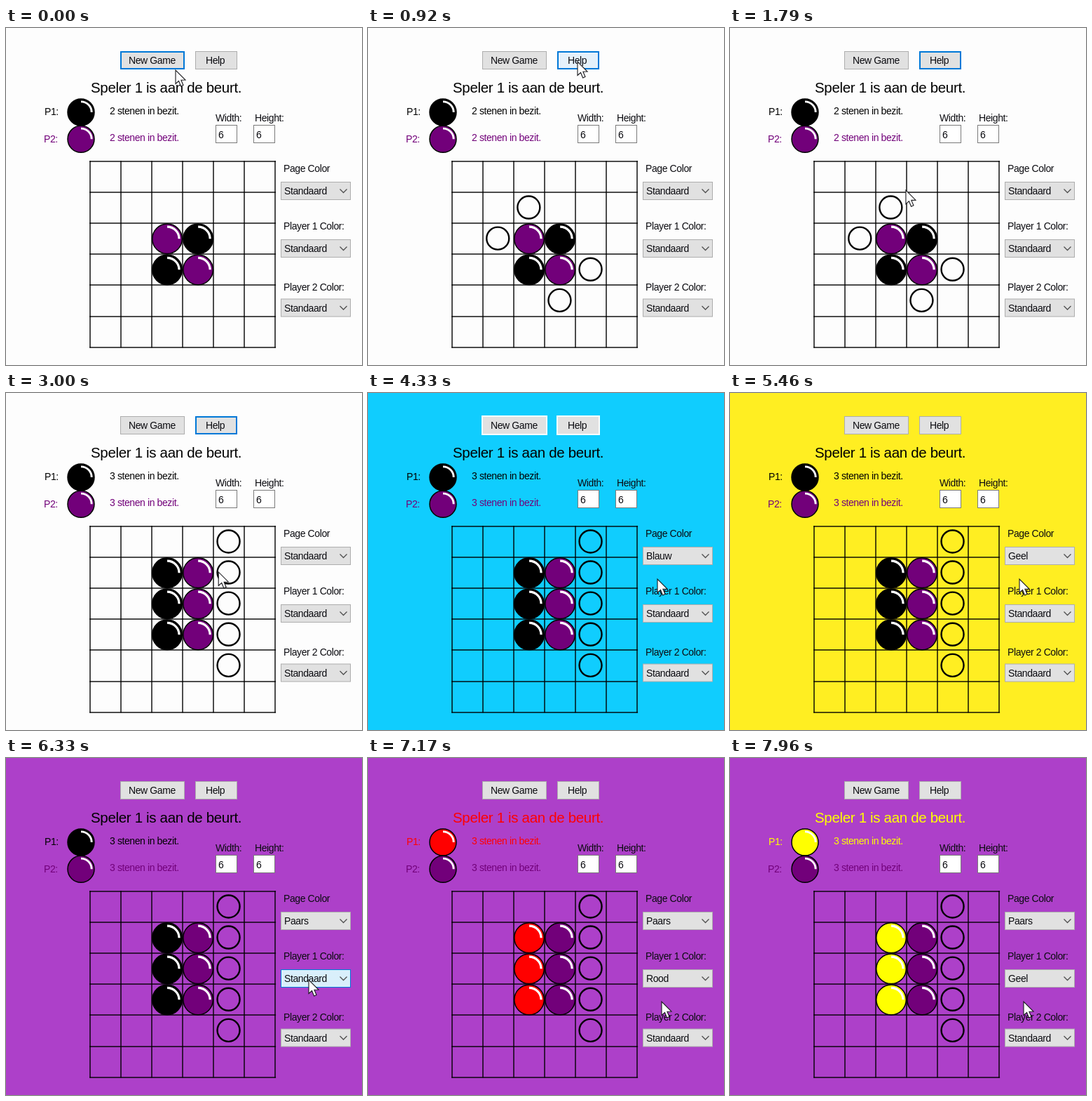
Recreate the animation shown at these times as an HTML page with a canvas. Size 508x480 px, loop 8000 ms.

```html
<!DOCTYPE html>
<html lang="nl">
<head>
<meta charset="utf-8">
<title>Bordspel</title>
<style>
  html, body { margin: 0; width: 100%; height: 100%; overflow: hidden; background: #fdfdfd; }
  canvas { display: block; width: 508px; height: 480px; }
</style>
</head>
<body>
<canvas id="stage" width="508" height="480"></canvas>
<script>
const ctx = document.getElementById('stage').getContext('2d');
const LOOP = 8000;
const FONT = '"Liberation Sans", Arial, sans-serif';
const INK = '#0b0b10', PURPLE = '#72007a', ACCENT = '#0078d7';
const BOARD = { x: 119.8, y: 190, cell: 44.1, size: 6 };

const NAMES = ['Standaard', 'Blauw', 'Rood', 'Groen', 'Geel', 'Paars'];
const PAGE = ['#fdfdfd', '#10cdfe', '#cc0e3e', '#14ff82', '#ffee22', '#ad40c9'];
const STONE = ['#000000', '#0000ff', '#ff0000', '#008000', '#ffff00', '#800080'];

// Moments at which each selected index moves one step down its list
const PAGE_STEPS = [4250, 4500, 4750, 5150, 5500];
const STONE_STEPS = [6830, 7150, 7450, 7720];
const HELP_AT = 680, MOVE1 = 2140, MOVE2 = 2740;
const MENUS = [
  { from: 3780, to: 4250, x: 392, y: 245 },
  { from: 6400, to: 6830, x: 392, y: 327 }
];

// Cursor path: time, x, y
const PATH = [
  [0, 242, 60], [60, 242, 60], [560, 299, 48], [1000, 299, 48], [1790, 251, 231],
  [2050, 232, 255], [2300, 232, 255], [2620, 274, 256], [2820, 274, 256],
  [3000, 303, 255], [3600, 440, 233], [3840, 440, 233], [4160, 413, 265],
  [5930, 413, 265], [6270, 432, 316], [6480, 432, 316], [6760, 419, 347], [8000, 419, 347]
];

const same = (a, b) => a[1] === b[1] && a[2] === b[2];

function speed(i, axis) {
  const a = PATH[i - 1], b = PATH[i], c = PATH[i + 1];
  if (!a || !c || same(a, b) || same(b, c)) return 0;
  return (c[axis] - a[axis]) / (c[0] - a[0]);
}

function cursorAt(t) {
  let i = 0;
  while (i < PATH.length - 2 && t >= PATH[i + 1][0]) i++;
  const a = PATH[i], b = PATH[i + 1], d = b[0] - a[0];
  const u = (t - a[0]) / d, u2 = u * u, u3 = u2 * u;
  return [1, 2].map(k =>
    (2 * u3 - 3 * u2 + 1) * a[k] + (u3 - 2 * u2 + u) * d * speed(i, k) +
    (3 * u2 - 2 * u3) * b[k] + (u3 - u2) * d * speed(i + 1, k));
}

const stepAt = (steps, t) => steps.filter(s => t >= s).length;

// Stones and hints are [row, column]
function gameAt(t) {
  if (t < MOVE1) return {
    turn: 1, p1: [[2, 3], [3, 2]], p2: [[2, 2], [3, 3]],
    hints: t < HELP_AT ? [] : [[1, 2], [2, 1], [3, 4], [4, 3]]
  };
  if (t < MOVE2) return {
    turn: 2, p1: [[1, 2], [2, 2], [3, 2], [2, 3]], p2: [[3, 3]],
    hints: [[1, 1], [1, 3], [3, 1]]
  };
  return {
    turn: 1, p1: [1, 2, 3].map(r => [r, 2]), p2: [1, 2, 3].map(r => [r, 3]),
    hints: [0, 1, 2, 3, 4].map(r => [r, 4])
  };
}

function text(s, x, y, color = INK, size = 14, track = -0.4) {
  ctx.font = size + 'px ' + FONT;
  ctx.letterSpacing = track + 'px';
  ctx.fillStyle = color;
  ctx.fillText(s, x, y);
}

function box(x, y, w, h, fill, edge, line = 1) {
  ctx.fillStyle = edge;
  ctx.fillRect(x, y, w, h);
  ctx.fillStyle = fill;
  ctx.fillRect(x + line, y + line, w - 2 * line, h - 2 * line);
}

const inside = (p, x, y, w, h) => p[0] >= x && p[0] < x + w && p[1] >= y && p[1] < y + h;

function button(label, x, w, tx, focus, ring, mouse) {
  const over = inside(mouse, x, 33, w, 26);
  if (ring) {
    ctx.fillStyle = ring;
    ctx.fillRect(x - 1, 32, w + 2, 28);
  }
  box(x, 33, w, 26, over ? '#e5f1fb' : '#e1e1e1',
    focus || over ? ACCENT : ring || '#adadad', focus ? 2 : 1);
  text(label, tx, 51);
}

function combo(value, y, mouse, open) {
  const over = open || inside(mouse, 392, y, 100, 26);
  box(392, y, 100, 26, over ? '#d9effb' : '#e1e1e1', over ? ACCENT : '#adadad');
  text(value, 397, y + 18);
  ctx.strokeStyle = '#505050';
  ctx.lineWidth = 1.3;
  ctx.beginPath();
  ctx.moveTo(476.5, y + 10.5);
  ctx.lineTo(481.5, y + 15.5);
  ctx.lineTo(486.5, y + 10.5);
  ctx.stroke();
}

function menu(m, mouse) {
  const row = 15.6;
  box(m.x, m.y, 100, row * NAMES.length + 2, '#ffffff', ACCENT);
  const hot = Math.max(0, Math.min(NAMES.length - 1, Math.floor((mouse[1] - m.y - 1) / row)));
  NAMES.forEach((name, i) => {
    const y = m.y + 1 + i * row;
    if (i === hot) {
      ctx.fillStyle = ACCENT;
      ctx.fillRect(m.x + 1, y, 98, row);
    }
    text(name, m.x + 4, y + 12.6, i === hot ? '#ffffff' : INK);
  });
}

function stone(x, y, r, color) {
  ctx.beginPath();
  ctx.arc(x, y, r, 0, 2 * Math.PI);
  ctx.fillStyle = color;
  ctx.fill();
  ctx.strokeStyle = '#000000';
  ctx.lineWidth = 1.5;
  ctx.stroke();
  ctx.beginPath();
  ctx.arc(x, y, r * 0.8, -Math.PI / 2, 0);
  ctx.strokeStyle = '#ffffff';
  ctx.lineWidth = r * 0.15;
  ctx.stroke();
}

function board(game, colors) {
  const { x, y, cell, size } = BOARD, span = cell * size;
  const center = ([r, c]) => [x + (c + 0.5) * cell, y + (r + 0.5) * cell];
  ctx.fillStyle = '#000000';
  for (let i = 0; i <= size; i++) {
    ctx.fillRect(Math.round(x + i * cell) - 0.7, y - 0.7, 1.4, span + 1.4);
    ctx.fillRect(x - 0.7, Math.round(y + i * cell) - 0.7, span + 1.4, 1.4);
  }
  [game.p1, game.p2].forEach((list, i) =>
    list.forEach(p => stone(...center(p), 21.3, colors[i])));
  ctx.strokeStyle = '#000000';
  ctx.lineWidth = 2.4;
  for (const p of game.hints) {
    const [cx, cy] = center(p);
    ctx.beginPath();
    ctx.arc(cx - 0.7, cy - 0.6, 16, 0, 2 * Math.PI);
    ctx.stroke();
  }
}

function pointer([x, y]) {
  const shape = [[0, 0], [0, 19.5], [4.5, 15.5], [7.6, 23], [11, 21.5], [7.9, 14.2], [14, 14]];
  ctx.beginPath();
  shape.forEach(([dx, dy]) => ctx.lineTo(x + dx, y + dy));
  ctx.closePath();
  ctx.fillStyle = '#ffffff';
  ctx.fill();
  ctx.strokeStyle = '#18181c';
  ctx.lineWidth = 1.1;
  ctx.stroke();
}

function draw(t) {
  const mouse = cursorAt(t), game = gameAt(t);
  const page = stepAt(PAGE_STEPS, t), pick = stepAt(STONE_STEPS, t);
  const colors = [STONE[pick], PURPLE];
  const open = MENUS.map(m => t >= m.from && t < m.to);

  // Some controls repaint slightly later than the page
  const age = page ? t - PAGE_STEPS[page - 1] : Infinity;
  const ring = age < 130 ? PAGE[page - 1] : null;

  ctx.fillStyle = PAGE[page];
  ctx.fillRect(0, 0, 508, 480);

  button('New Game', 163, 92, 175, t < HELP_AT, ring, mouse);
  button('Help', 270, 60, 285, t >= HELP_AT && t < MENUS[0].from, ring, mouse);
  text(`Speler ${game.turn} is aan de beurt.`, 121, 92, colors[game.turn - 1], 20.5, -0.33);

  if (age < 45) box(145, 110, 108, 16, PAGE[page - 1], PAGE[page - 1]);
  text('P1:', 55, 124, colors[0]);
  text('P2:', 54, 163, colors[1]);
  text(`${game.p1.length} stenen in bezit.`, 148, 123, colors[0]);
  text(`${game.p2.length} stenen in bezit.`, 148, 161, colors[1]);
  stone(107, 120, 19, colors[0]);
  stone(107, 158.3, 19, colors[1]);

  text('Width:', 299, 133);
  text('Height:', 355, 133);
  for (const x of [299, 353]) {
    box(x, 138, 31, 26, '#ffffff', '#7a7a7a');
    text('6', x + 4, 157);
  }

  text('Page Color', 396, 205);
  text('Player 1 Color:', 396, 287);
  text('Player 2 Color:', 396, 374);
  const shut = !open[0] && !open[1];
  const hover = shut ? mouse : [-1, -1];
  combo(NAMES[page], 219, hover, open[0]);
  combo(NAMES[pick], 301, hover, open[1]);
  combo(NAMES[0], 385.5, hover, false);

  board(game, colors);
  MENUS.forEach((m, i) => open[i] && menu(m, mouse));
  pointer(mouse);
}

const start = performance.now();
function tick() {
  draw((performance.now() - start) % LOOP);
  requestAnimationFrame(tick);
}
tick();
</script>
</body>
</html>
```
